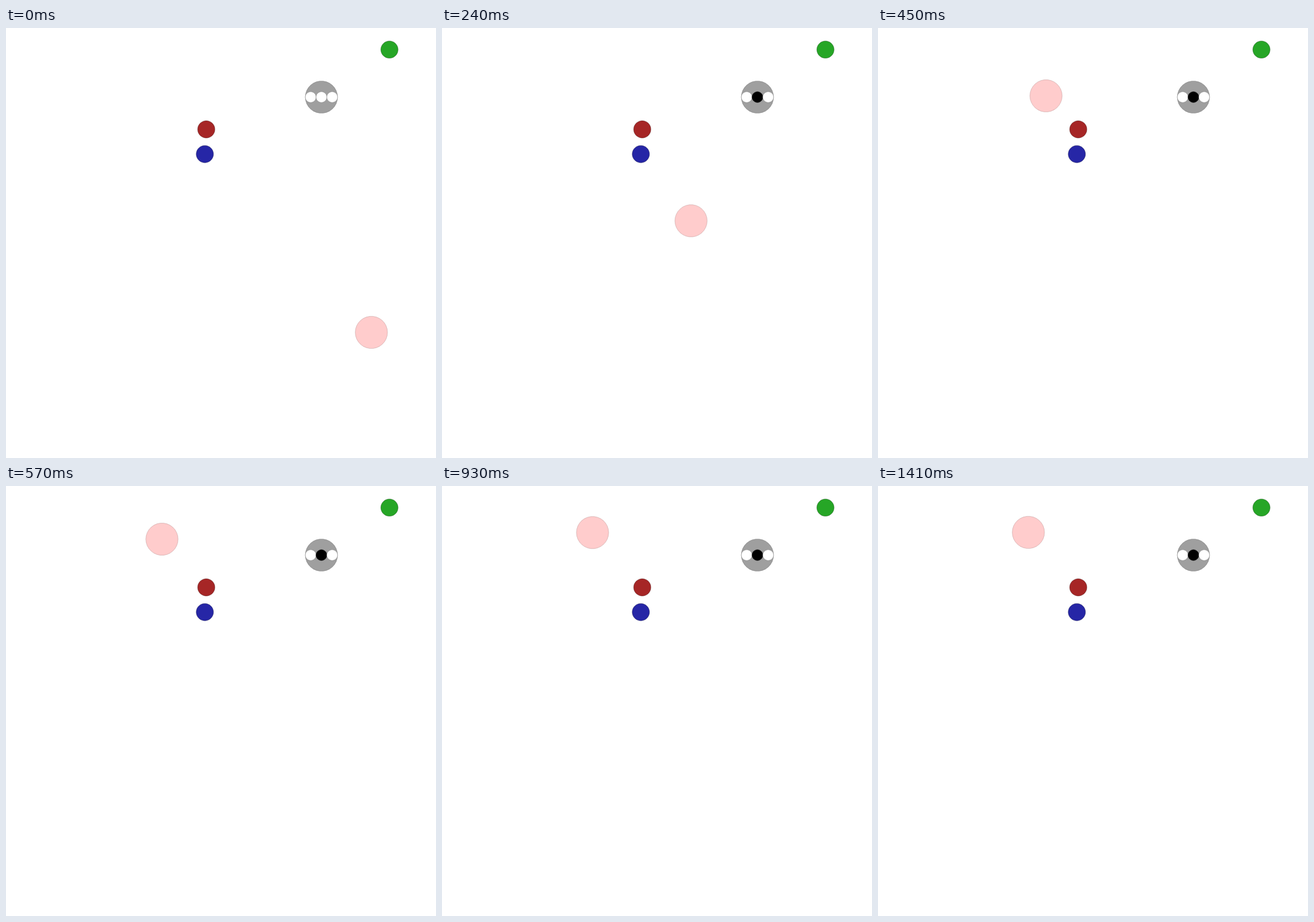
These frames come from a looping animation (700x700 px, 1530 ms). An HTML page with a canvas:

```html
<!DOCTYPE html>
<html lang="en">
<head>
<meta charset="utf-8">
<title>Particle world</title>
<style>
  html, body { margin: 0; width: 100%; height: 100%; overflow: hidden; background: #fff; }
  canvas { display: block; }
</style>
</head>
<body>
<canvas id="stage" width="700" height="700"></canvas>
<script>
const ctx = document.getElementById('stage').getContext('2d');
const LOOP = 1530, STEP = 30, LAST_STEP = 47;
const KEEP = 0.75;       // share of velocity kept at each step
const PUSH = 17.5;       // pixels per step gained from one push
const MOVES = 'uullluluuul';
const BIG = 26.25, SMALL = 14, DOT = 8.75;

const landmarks = [
  { x: 326, y: 165, color: [166, 38, 38] },
  { x: 624.2, y: 35.2, color: [38, 166, 38] },
  { x: 323.7, y: 205.3, color: [38, 38, 166] },
];
const speaker = { x: 513.5, y: 112.5 };

// Damped motion driven by one push per step, then coasting.
function simulate() {
  let x = 594.8, y = 495.5, vx = 0, vy = 0;
  const path = [{ x, y }];
  for (let i = 0; i < LAST_STEP; i++) {
    vx = vx * KEEP - (MOVES[i] === 'l' ? PUSH : 0);
    vy = vy * KEEP - (MOVES[i] === 'u' ? PUSH : 0);
    x += vx;
    y += vy;
    path.push({ x, y });
  }
  return path;
}
const path = simulate();

// A 30-sided disc with an outline of half its colour and opacity.
function disc(x, y, r, color, alpha = 1) {
  ctx.beginPath();
  for (let i = 0; i < 30; i++) {
    const a = i * Math.PI / 15;
    ctx.lineTo(x + r * Math.cos(a), y + r * Math.sin(a));
  }
  ctx.closePath();
  ctx.fillStyle = `rgba(${color}, ${alpha})`;
  ctx.fill();
  ctx.strokeStyle = `rgba(${color.map(c => c / 2)}, ${alpha / 2})`;
  ctx.stroke();
}

function draw(time) {
  const step = Math.min(Math.floor(time % LOOP / STEP), LAST_STEP);
  const listener = path[step];
  ctx.fillStyle = '#fff';
  ctx.fillRect(0, 0, 700, 700);
  ctx.lineWidth = 1;

  disc(speaker.x, speaker.y, BIG, [64, 64, 64], 0.5);
  for (let i = -1; i <= 1; i++) {
    const shade = i === 0 && step > 0 ? 0 : 255;
    disc(speaker.x + i * 2 * DOT, speaker.y, DOT, [shade, shade, shade]);
  }
  disc(listener.x, listener.y, BIG, [255, 153, 153], 0.5);
  for (const { x, y, color } of landmarks) disc(x, y, SMALL, color);
}

const start = performance.now();
function tick() {
  draw(performance.now() - start);
  requestAnimationFrame(tick);
}
tick();
</script>
</body>
</html>
```
